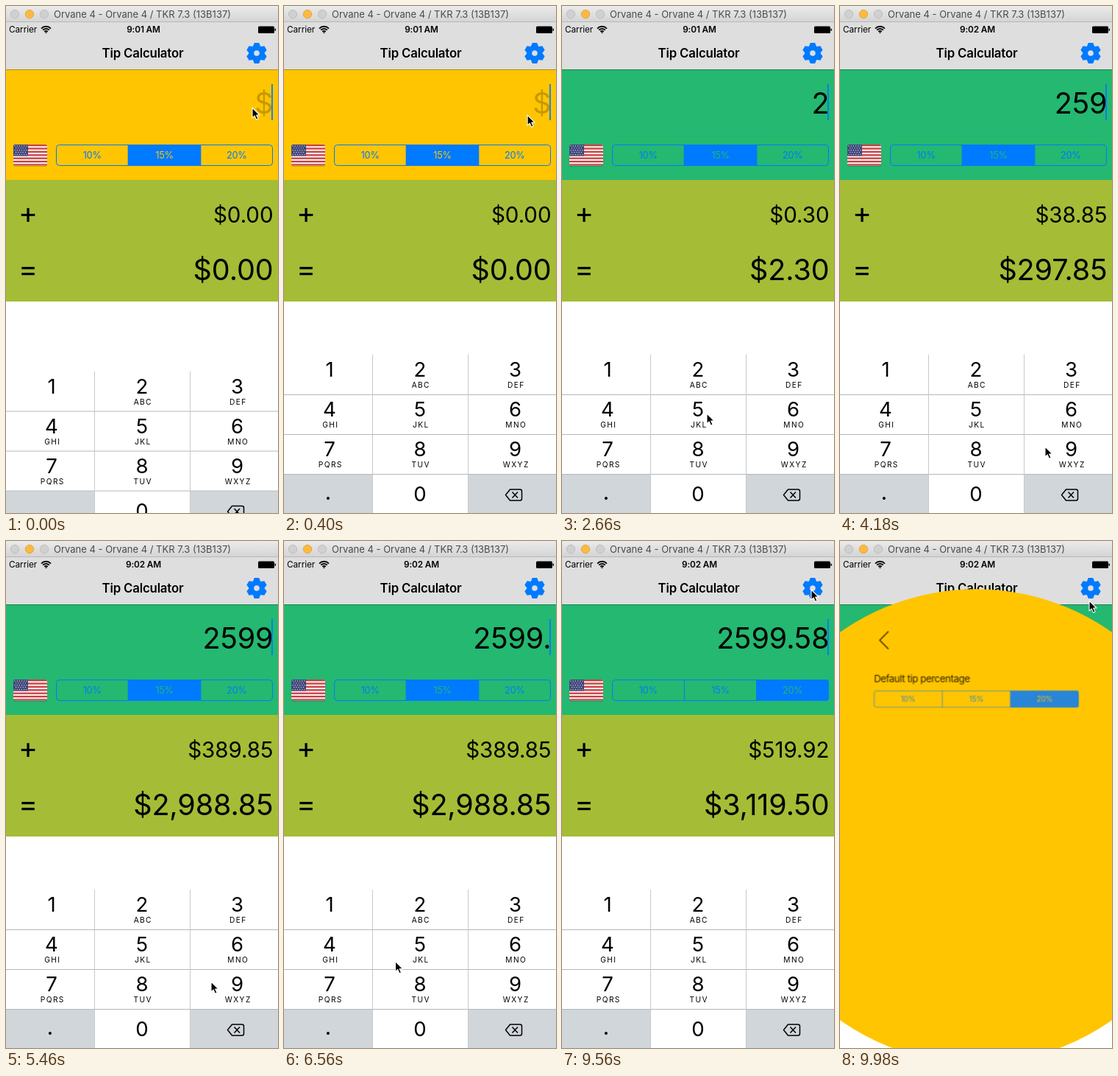
These frames come from a looping animation (370 by 688 pixels, 10000 ms). An HTML page:

```html
<!DOCTYPE html>
<html lang="en">
<head>
<meta charset="utf-8">
<title>Tip Calculator</title>
<style>
  html, body { margin: 0; width: 100%; height: 100%; overflow: hidden; background: #fff; }
  svg { display: block; width: 370px; height: 688px; }
  text { font-family: Inter, Roboto, sans-serif; white-space: pre; }
</style>
</head>
<body>
<svg id="stage" viewBox="0 0 370 688" xmlns="http://www.w3.org/2000/svg">
  <defs>
    <linearGradient id="chrome" x2="0" y2="1">
      <stop stop-color="#ebebeb"/><stop offset="1" stop-color="#d3d3d3"/>
    </linearGradient>
    <clipPath id="flagClip"><rect x="10" y="188" width="46" height="28.6" rx="2.5"/></clipPath>
  </defs>
</svg>
<script>
const NS = 'http://www.w3.org/2000/svg';
const LOOP = 10000;
const BLUE = '#007aff', YELLOW = '#ffc500', KEY_GRAY = '#d1d6db', HEADER = '#dedede';
const stage = document.getElementById('stage');

function set(node, attrs) {
  for (const k in attrs) node.setAttribute(k, attrs[k]);
  return node;
}
function add(parent, tag, attrs) {
  return parent.appendChild(set(document.createElementNS(NS, tag), attrs));
}
const group = (parent, attrs = {}) => add(parent, 'g', attrs);
const rect = (parent, x, y, width, height, fill, more = {}) =>
  add(parent, 'rect', { x, y, width, height, fill, ...more });
const path = (parent, d, attrs) => add(parent, 'path', { d, fill: 'none', ...attrs });
function label(parent, str, x, y, size, anchor = 'middle', more = {}) {
  const node = add(parent, 'text', { x, y, 'font-size': size, 'text-anchor': anchor, ...more });
  node.textContent = str;
  return node;
}

// Three-way control used on both screens
function segments(parent, x, y, w, h) {
  const g = group(parent), third = w / 3;
  const press = rect(g, x + 2 * third, y, third, h, BLUE, { opacity: 0 });
  const fill = path(g, '', { fill: BLUE });
  rect(g, x + .5, y + .5, w - 1, h - 1, 'none', { rx: 4, stroke: BLUE });
  for (const i of [1, 2]) rect(g, x + i * third - .5, y, 1, h, BLUE);
  const texts = ['10%', '15%', '20%'].map((s, i) =>
    label(g, s, x + (i + .5) * third, y + h / 2 + 4.6, 12.8, 'middle', { 'letter-spacing': '-.02em' }));
  return {
    select(n, bg, pressed) {
      const a = x + n * third - .5, b = a + third + 1;
      set(fill, { d: n === 2
        ? `M${a} ${y}H${b - 4.5}q4 0 4 4V${y + h - 4}q0 4 -4 4H${a}z`
        : `M${a} ${y}H${b}V${y + h}H${a}z` });
      texts.forEach((t, i) => set(t, { fill: i === n ? bg : BLUE }));
      set(press, { opacity: pressed ? .13 : 0 });
    }
  };
}

// Main screen
const panel = rect(stage, 0, 86, 370, 150, YELLOW);
rect(stage, 0, 236, 370, 165, '#a5bc36');
const figures = { 'letter-spacing': '-.003em' };
const amount = label(stage, '', 363.5, 146, 39.5, 'end', figures);
const tip = label(stage, '', 363.5, 294.3, 29.6, 'end', figures);
const total = label(stage, '', 363.5, 372, 39.5, 'end', figures);
label(stage, '+', 30, 294.5, 39.5);
label(stage, '=', 30, 370.5, 39.5);
const caret = rect(stage, 361, 106, 2, 49, BLUE);
const mainSeg = segments(stage, 68, 188, 295, 29);

// Flag
rect(stage, 10, 189, 46, 28.8, '#000', { rx: 2.5, opacity: .25 });
const flag = group(stage, { 'clip-path': 'url(#flagClip)' });
rect(flag, 10, 188, 46, 29, '#f4efec');
for (let i = 0; i < 13; i += 2) rect(flag, 10, 188 + i * 2.2, 46, 2.2, '#cb3d42');
rect(flag, 10, 188, 20, 15.4, '#3f4478');
for (let r = 0; r < 5; r++)
  for (let c = 0; c < 6 - r % 2; c++)
    add(flag, 'circle', { cx: 12 + c * 3.2 + (r % 2) * 1.6, cy: 190 + r * 2.85, r: .7, fill: '#d8d8e6' });

// Window bar, status bar, navigation bar
rect(stage, 0, 22, 370, 64, HEADER);
rect(stage, 0, 86, 370, 1, '#000', { opacity: .3 });
rect(stage, 0, 0, 370, 22, 'url(#chrome)');
rect(stage, 0, 21, 370, 1, '#b9b9b9');
['#d0d0d0', '#fdb93f', '#d0d0d0'].forEach((fill, i) =>
  add(stage, 'circle', { cx: 12 + i * 20, cy: 11, r: 5.7, fill, stroke: i === 1 ? '#dd9f35' : '#b8b8b8', 'stroke-width': .8 }));
label(stage, 'Orvane 4 - Orvane 4 / TKR 7.3 (13B137)', 185.5, 16, 13, 'middle', { fill: '#4a4a4a' });
label(stage, 'Carrier', 4, 36.3, 11.8, 'start', { 'letter-spacing': '-.005em' });
for (const r of [3, 6, 9]) {
  const k = r * .72;
  path(stage, `M${54.5 - k} ${37 - k}A${r} ${r} 0 0 1 ${54.5 + k} ${37 - k}`, { stroke: '#000', 'stroke-width': 1.8 });
}
path(stage, 'M52.9 35.6L54.5 37.4L56.1 35.6z', { fill: '#000' });
const clock = label(stage, '', 187, 36.3, 11.8, 'middle', { 'font-weight': 600, 'letter-spacing': '-.01em' });
rect(stage, 343, 27.5, 22, 9.5, '#000', { rx: 1.5 });
rect(stage, 365.6, 30.5, 1.4, 3.5, '#000', { rx: .7 });
label(stage, 'Tip Calculator', 186, 70, 16.8, 'middle', { 'font-weight': 600, 'letter-spacing': '-.01em' });

const gear = group(stage, { transform: 'translate(341 64)', fill: BLUE });
add(gear, 'circle', { r: 10.6 });
for (let a = 0; a < 360; a += 60)
  path(gear, 'M-5.2 -9L-3.2 -13.9H3.2L5.2 -9z', { fill: BLUE, transform: `rotate(${a})` });
add(gear, 'circle', { r: 3.8, fill: HEADER });

// Keypad
const pad = group(stage);
const colX = [0, 121, 250, 370], midX = [62, 185, 314.5];
const rowY = r => 473 + r * 54.2;
rect(pad, 0, 473, 370, 216, '#fff');
const keys = {};
['1', '2', '3', '4', '5', '6', '7', '8', '9', '.', '0', '⌫'].forEach((name, i) => {
  const c = i % 3, r = Math.floor(i / 3);
  const base = r === 3 && c !== 1 ? KEY_GRAY : '#fff';
  const cell = rect(pad, colX[c], rowY(r), colX[c + 1] - colX[c], 54.2, base);
  keys[name] = { cell, base, down: base === '#fff' ? KEY_GRAY : '#fff' };
  if (name === '.') label(pad, '.', 60, 670, 27.6, 'middle', { 'font-weight': 500 });
  else if (c < 2 || r < 3) label(pad, name, midX[c], r < 3 ? 503 + r * 54 : 672, 27.6);
});
['ABC', 'DEF', 'GHI', 'JKL', 'MNO', 'PQRS', 'TUV', 'WXYZ'].forEach((s, i) => {
  const k = i + 1;
  label(pad, s, midX[k % 3] + 1.3, 518 + Math.floor(k / 3) * 54, 10.2, 'middle', { 'letter-spacing': 1.4 });
});
for (const y of [527, 581, 635]) rect(pad, 0, y, 370, 1, '#b4b7ba');
for (const x of [120, 250]) rect(pad, x, 473, 1, 215, '#c6c9cc');
path(pad, 'M307.5 656H321q2.5 0 2.5 2.5V668.5q0 2.5 -2.5 2.5H307.5L301.5 663.5zM310.5 659.5L318 667.5M318 659.5L310.5 667.5',
  { stroke: '#000', 'stroke-width': 1.5, 'stroke-linejoin': 'round' });

// Settings screen, opening out of the centre
const CX = 185, CY = 387;
const bubble = add(stage, 'circle', { cx: CX, cy: CY, r: 0, fill: YELLOW });
const settings = group(stage);
path(settings, 'M33.5 50.7L18.5 66L33.5 81.4', { stroke: '#000', 'stroke-width': 1.8 });
label(settings, 'Default tip percentage', 8.5, 138.3, 16.8, 'start', { 'letter-spacing': '-.03em' });
segments(settings, 8.5, 153, 354.3, 29.4).select(2, YELLOW, false);

const pointer = path(stage, 'M0 0V13.8L3.2 10.9L5.5 16.2L8 15.1L5.7 10H10z',
  { fill: '#000', stroke: '#fff', 'stroke-width': 1.1, 'stroke-linejoin': 'round' });

// Timeline
const typed = [[2080, '2'], [2900, '5'], [3900, '9'], [5400, '9'], [6290, '.'], [6920, '5'], [7500, '8']];
const HOLD = 130, TAP = 8440, OPEN = 9630;
const moves = [
  [0, 335, 138], [300, 335, 138], [1300, 198, 493], [2150, 198, 493], [2600, 197, 553],
  [3050, 197, 553], [3600, 279, 598], [5550, 279, 598], [6120, 70, 641], [6300, 70, 641],
  [6733, 195, 533], [7000, 195, 533], [7350, 196, 598], [7620, 196, 598], [8300, 293, 210],
  [8560, 293, 210], [9300, 339, 66], [9680, 339, 66], [9960, 339, 81], [LOOP, 339, 81]
];
const clamp = v => Math.max(0, Math.min(1, v));
const smooth = p => p * p * (3 - 2 * p);
const mix = (a, b, p) => a + (b - a) * p;
const money = v => '$' + v.toLocaleString('en-US', { minimumFractionDigits: 2, maximumFractionDigits: 2 });

function write(node, str) {
  if (node.textContent !== str) node.textContent = str;
}

function draw(t) {
  // Amounts
  const done = typed.filter(k => t >= k[0]);
  const input = done.map(k => k[1]).join('');
  const bill = parseFloat(input) || 0;
  const choice = t < TAP ? 1 : 2;
  const extra = bill * [.1, .15, .2][choice];
  write(amount, input || '$');
  set(amount, { opacity: input ? 1 : .22 });
  write(tip, money(extra));
  write(total, money(bill + extra));
  write(clock, t < 3600 ? '9:01 AM' : '9:02 AM');

  // Panel colour and tip choice
  const p = smooth(clamp((t - 2080) / 400));
  const bg = `rgb(${[[255, 36], [197, 184], [0, 113]].map(([a, b]) => Math.round(mix(a, b, p)))})`;
  set(panel, { fill: bg });
  mainSeg.select(choice, bg, t >= TAP - 90 && t < TAP);

  // Caret blink restarts with each key and ends when settings open
  const since = (t - (done.length ? done[done.length - 1][0] : 0)) % 1000;
  const blink = since < 700 ? clamp((750 - since) / 100) : clamp((since - 900) / 100);
  set(caret, { opacity: t < OPEN ? .85 * blink : 0 });

  // Keypad
  for (const k in keys) {
    const down = typed.some(([at, name]) => name === k && t >= at - HOLD && t < at);
    set(keys[k].cell, { fill: down ? keys[k].down : keys[k].base });
  }
  const rise = 23 * Math.exp(-t / 50);
  const fall = 214.2 * (1 - (1 - clamp((t - OPEN) / 400)) ** 4);
  set(pad, { transform: `translate(0 ${rise + fall})` });

  // Settings
  const s = smooth(clamp((t - OPEN) / 500));
  set(bubble, { r: 409 * s });
  set(settings, { opacity: s ** .7, transform: `translate(${CX} ${CY}) scale(${s}) translate(${-CX} ${-CY})` });

  // Pointer
  const i = Math.max(1, moves.findIndex(m => m[0] > t));
  const [t0, x0, y0] = moves[i - 1], [t1, x1, y1] = moves[i];
  const q = smooth((t - t0) / (t1 - t0));
  set(pointer, { transform: `translate(${mix(x0, x1, q)} ${mix(y0, y1, q)})` });
}

const start = performance.now();
function tick() {
  draw((performance.now() - start) % LOOP);
  requestAnimationFrame(tick);
}
tick();
</script>
</body>
</html>
```
